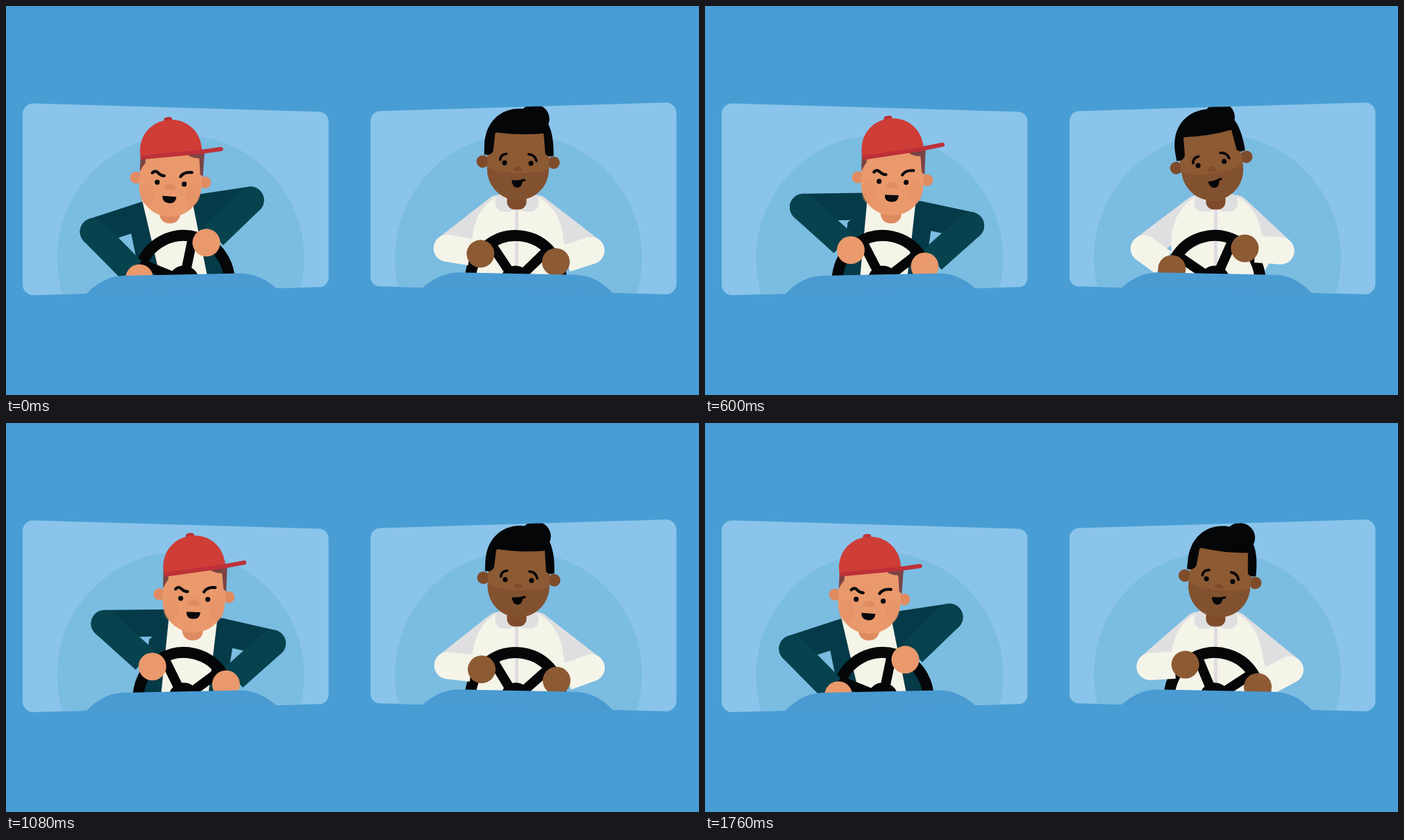
Recreate the animation shown at these times as an HTML page with a canvas. Size 998 px wide and 561 px high, loop 1800 ms.

```html
<!DOCTYPE html>
<html lang="en">
<head>
<meta charset="utf-8">
<title>Two drivers</title>
<style>
html, body { margin: 0; width: 100%; height: 100%; overflow: hidden; background: #489ed4; }
canvas { display: block; }
</style>
</head>
<body>
<canvas id="stage" width="998" height="561"></canvas>
<script>
const c = document.getElementById('stage').getContext('2d');
const LOOP = 1800, STEP = 40;
const rad = deg => deg * Math.PI / 180;
// Blend from a to b; bow bends the middle of the way.
const mix = (a, b, k, bow = 0) => a + (b - a) * k + bow * 4 * k * (1 - k);

function ease(x, a) {
  let lo = 0, hi = 1;
  for (let i = 0; i < 24; i++) {
    const s = (lo + hi) / 2, r = 1 - s;
    if (3 * s * r * r * a + 3 * s * s * r * (1 - a) + s ** 3 < x) lo = s; else hi = s;
  }
  return lo * lo * (3 - 2 * lo);
}

// Swings 0 to 1 and back; mid is the time halfway through a rise.
function swing(t, mid, half, a) {
  const u = (t - mid) / half + 0.5, n = Math.floor(u), y = ease(u - n, a);
  return n % 2 ? 1 - y : y;
}

function fill(color, d) {
  c.fillStyle = color;
  c.fill(new Path2D(d));
}
function line(color, width, d, cap = 'round') {
  c.strokeStyle = color;
  c.lineWidth = width;
  c.lineCap = cap;
  c.stroke(new Path2D(d));
}
function oval(color, x, y, rx, ry = rx) {
  c.fillStyle = color;
  c.beginPath();
  c.ellipse(x, y, rx, ry, 0, 0, 7);
  c.fill();
}
function box(color, x, y, w, h, r) {
  c.fillStyle = color;
  c.beginPath();
  c.roundRect(x, y, w, h, r);
  c.fill();
}
function placed(x, y, deg, draw) {
  c.save();
  c.translate(x, y);
  c.rotate(rad(deg));
  draw();
  c.restore();
}
const limb = (color, a, b, cap) => line(color, 39, `M${a} L${b}`, cap);

function flip() {
  c.translate(989.5, -1.2);
  c.scale(-1, 1);
}

function car(mirrored, driver) {
  c.save();
  if (mirrored) flip();
  c.beginPath();
  c.moveTo(24, 280);
  c.arcTo(24, 140, 240, 146.4, 15);
  c.arcTo(464.5, 153, 464.5, 280, 14);
  c.arcTo(464.5, 405, 240, 411.2, 13);
  c.arcTo(24, 417.5, 24, 280, 15);
  c.closePath();
  c.fillStyle = '#8ac4ea';
  c.fill();
  c.clip();
  oval('#7bbce1', 251.5, 364, 178);
  c.resetTransform();
  c.beginPath();
  c.rect(0, 0, 998, 393);
  c.clip();
  driver();
  c.restore();

  c.save();
  if (mirrored) flip();
  fill('#4a9bd2', 'M115 416 Q139 390 168 389 L338 385.500 Q366 386 390 408Z');
  c.restore();
}

function wheel(x, turn) {
  placed(x, 396.5, turn, () => {
    c.strokeStyle = '#050608';
    c.lineWidth = 16;
    c.beginPath();
    c.arc(0, 0, 65.5, 0, 7);
    c.stroke();
    oval('#050608', 0, 0, 22);
    for (const side of [-1, 1])
      line('#050608', 14, `M0 0 L${side * 40} -48`);
  });
}

const grip = (x, deg) => [x + 64 * Math.sin(rad(deg)), 396.5 - 64 * Math.cos(rad(deg))];

function arms(sleeve, skin, x, turn, elbows) {
  const hands = [grip(x, turn - 58.5), grip(x, turn + 58.5)];
  hands.forEach(([hx, hy], i) => {
    const [ex, ey] = elbows[i], k = 1 - 15 / Math.hypot(hx - ex, hy - ey);
    oval(sleeve, ex, ey, 19.5);
    limb(sleeve, elbows[i], [mix(ex, hx, k), mix(ey, hy, k)], 'butt');
  });
  hands.forEach(h => oval(skin, ...h, 20));
}

function cappedHead(p) {
  const ink = '#08090c', skin = '#e9996c', shade = '#e08b62', hair = '#7b4444';
  placed(mix(237, 272, p), mix(251, 249, p), mix(4, 2.3, p), () => {
    oval(shade, -50, 0, 8.5);
    oval(shade, 50, 0, 8.5);
    fill(skin, 'M-45 -45 H45 V8 A45 45 0 0 1 -45 8Z');
    c.globalAlpha = 0.35;
    oval(shade, -32, 22, 11, 16);
    oval(shade, 34, 18, 10, 16);
    c.globalAlpha = 1;
    fill(hair, 'M-46 -45 H-38 V-22 Q-41 -18 -45 -9Z');
    fill(hair, 'M16 -46 H46 L46 -8 L42 -11 L39 -34 Q24 -33 16 -44Z');
    fill(shade, 'M-9 14 A9 9 0 0 1 9 14Z');
    oval(ink, -19, 4.5, 3.6);
    oval(ink, 20, 4.5, 3.6);
    line(ink, 4.2, 'M-27 -8.500 Q-23 -13.500 -18.500 -9 Q-14 -5 -9.500 -5.500');
    line(ink, 4.2, 'M14 -6 Q18.500 -13.500 30 -13');
    fill(ink, 'M-10 23.500 H10 Q10 33.500 0 33.500 Q-10 33.500 -10 23.500Z');
  });
  const lift = 4 * p * (1 - p);
  placed(mix(238, 273, p), mix(213, 211.7, p) - 4 * lift, -mix(5.4, 7, p) - 8 * lift, () => {
    box('#b93036', -6, -53, 12, 9, 4);
    fill('#cf3d37', 'M-44.500 4 V-4 C-44.500 -31 -24 -49 0 -49 C24 -49 44.500 -31 44.500 -4 V2Z');
    line('#bd3038', 6, 'M-44 1.500 H44', 'butt');
    line('#bd3038', 6, 'M40 1.500 L72 0');
  });
}

function leftDriver(p) {
  const jacket = '#053a48', sleeve = '#07434e';
  const turn = mix(-28, 15, p), lean = 38 * p;
  const elbows = [
    [mix(126, 142.5, p), mix(325.5, 288, p)],
    [mix(352, 384.5, p), mix(280, 319, p)]
  ];
  limb(jacket, elbows[0], [207 + lean, mix(299, 288, p)]);
  limb(jacket, elbows[1], [272 + lean, mix(292, 301, p)]);
  fill(jacket, `M${177 + lean * 0.8} 312 L${203 + lean} 283 H${268 + lean}
    L${298 + lean * 0.85} 304 L315 395 H194Z`);
  fill('#f5f4e8', `M${196 + lean * 1.05} 280 H${268 + lean} L291 395 H223Z`);
  box('#de8a60', mix(221, 255, p), 280, 30, 33.5, 14);
  cappedHead(p);
  wheel(256, turn);
  arms(sleeve, '#e9996c', 256, turn, elbows);
}

function quiffHead(q) {
  const ink = '#050608', skin = '#8c5a33', shade = '#7e4c2b';
  placed(736.7, 273, mix(-9.2, 7.3, q), () => {
    c.translate(0, -48);
    oval(shade, -51, 0, 9);
    oval(shade, 51, 0, 9);
    fill(skin, 'M-44.500 -48 H44.500 V10 A44.500 45 0 0 1 -44.500 10Z');
    fill('#825130', 'M-44.500 6 Q-36 14 -20 15 Q0 17 20 15 Q36 15 44.500 8 V10 A44.500 45 0 0 1 -44.500 10Z');
    fill(shade, 'M-7 13 A6.500 6.500 0 0 1 6 13Z');
    fill(ink, `M-49 -10 V-24 C-48 -58 -26 -77 2 -77 C36 -77 51 -56 51 -10
      Q44 -7 39 -12 L36 -42 Q4 -38 -31 -42 Q-34 -42 -34 -40 L-36 -16 Q-39 -8 -49 -10Z`);
    fill(ink, 'M-10 -68 Q4 -68 6 -77 Q12 -84 24 -84 V-60Z');
    oval(ink, 23, -62.5, 21);
    oval(ink, -19.5, 1.5, 3.6);
    oval(ink, 18.5, 1.5, 3.6);
    line(ink, 3.6, 'M-26 -3 Q-25 -11 -17 -11.500');
    line(ink, 3.6, 'M15 -11.500 Q24 -11 26.500 -2');
    fill(ink, 'M-9 26.500 Q2 27 9 24 Q12 24 11 27 L7 28 Q6 37 -1 37 Q-8 36 -9 26.500Z');
  });
}

function rightDriver(q) {
  const cream = '#f5f4e9', grey = '#dfdfe1';
  const turn = mix(-16, 20, q);
  const elbows = [
    [mix(632.5, 643, q, -3.9), mix(350, 352, q, -2)],
    [mix(829, 841.5, q, 6), mix(353, 357, q, -3)]
  ];
  limb(grey, elbows[0], [709, 292]);
  limb(grey, elbows[1], [764, 292]);
  fill(cream, 'M705 276 Q674 294 671 340 L673 395 H798 L813 370 L803 338 Q799 294 768 276Z');
  line('#e1dbe1', 5, 'M735.500 290 V390', 'butt');
  box(grey, 704.5, 270, 31, 26.5, 12);
  box(grey, 736, 270, 31, 26.5, 12);
  box('#7e4c2b', 721.5, 268, 28, 25.5, 11);
  quiffHead(q);
  wheel(734, turn);
  arms(cream, '#8c5a33', 734, turn, elbows);
}

function frame() {
  const t = Math.floor(performance.now() % LOOP / STEP) * STEP;
  c.fillStyle = '#489ed4';
  c.fillRect(0, 0, 998, 561);
  car(false, () => leftDriver(swing(t, 422, 890, 0.9)));
  car(true, () => rightDriver(swing(t, 1015, 975, 0.66)));
  requestAnimationFrame(frame);
}
frame();
</script>
</body>
</html>
```
